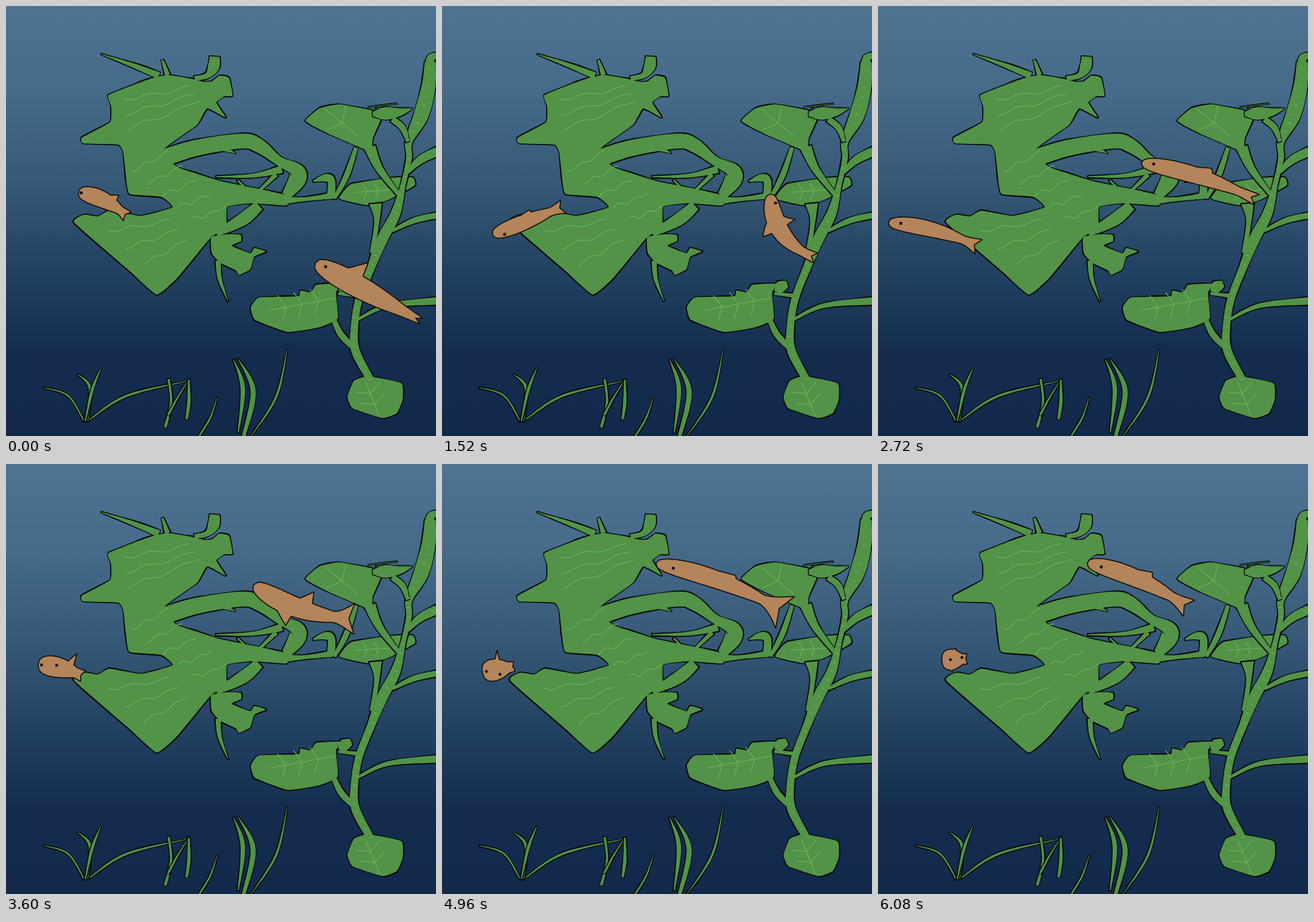
Animation of 748 by 748 pixels, one loop 6160 ms. Source, as an HTML page with a canvas:

```html
<!DOCTYPE html>
<html lang="en">
<meta charset="utf-8">
<title>Two fish among water plants</title>
<style>
  html, body { margin: 0; height: 100%; overflow: hidden; background: #142d4f; }
  canvas { display: block; width: 100vw; height: 100vh; }
</style>
<canvas id="stage" width="748" height="748"></canvas>
<script>
const SIZE = 748, LOOP = 6160, STEP = 80;
const GREEN = "#529347", VEIN = "#67b25c", INK = "#070b0c", FISH = "#b4845a";
const stage = document.getElementById("stage").getContext("2d");
const scene = document.createElement("canvas");
scene.width = scene.height = SIZE;
const pen = scene.getContext("2d");
pen.lineCap = pen.lineJoin = stage.lineJoin = "round";

// ---- geometry ----

const points = (text, size) => {
  const n = text.split(/[ ,]+/).map(Number);
  return Array.from({ length: n.length / size }, (_, i) => n.slice(i * size, (i + 1) * size));
};

// Hermite curve through every point; all coordinates, widths too, are interpolated.
function curve(pts, closed, tension) {
  const n = pts.length, out = [], parts = 8;
  const at = i => pts[closed ? (i + n) % n : Math.min(n - 1, Math.max(0, i))];
  for (let i = 0; i < (closed ? n : n - 1); i++) {
    const [a, b, c, d] = [-1, 0, 1, 2].map(k => at(i + k));
    for (let s = 0; s < parts; s++) {
      const t = s / parts, e = t * t * (3 - 2 * t);
      out.push(b.map((v, k) => v + (c[k] - v) * e
        + tension * t * (1 - t) * ((c[k] - a[k]) * (1 - t) - (d[k] - v) * t)));
    }
  }
  return closed ? out : [...out, pts[n - 1]];
}

// The two edges of a spine of [x, y, half width, other half width].
function edges(spine) {
  const up = [], down = [];
  spine.forEach(([x, y, w, v = w], i) => {
    const [x0, y0] = spine[Math.max(0, i - 1)];
    const [x1, y1] = spine[Math.min(spine.length - 1, i + 1)];
    const len = Math.hypot(x1 - x0, y1 - y0) || 1;
    const nx = (y1 - y0) / len, ny = (x0 - x1) / len;
    up.push([x + nx * w, y + ny * w]);
    down.unshift([x - nx * v, y - ny * v]);
  });
  return [up, down];
}

const blob = text => curve(points(text, 2), true, .2);
const limb = text => edges(curve(points(text, 3), false, .5).map(([x, y, w]) => [x, y, Math.max(.2, w / 2)])).flat();

function trace(ctx, pts) {
  ctx.beginPath();
  pts.forEach(([x, y]) => ctx.lineTo(x, y));
}

// ---- hand-drawn plants ----

// Ink of uneven weight goes under all parts, so that joined parts share one outline.
function plant(weight, ...parts) {
  pen.strokeStyle = INK;
  for (const part of parts) {
    part.forEach((p, i) => {
      trace(pen, [p, part[(i + 1) % part.length]]);
      pen.lineWidth = weight * (1 + .4 * Math.sin(i * .31 + p[0] * .02) * Math.sin(i * .13));
      pen.stroke();
    });
  }
  pen.fillStyle = GREEN;
  for (const part of parts) {
    trace(pen, part);
    pen.fill();
  }
}

function line(color, width, pts) {
  pen.strokeStyle = color;
  pen.lineWidth = width;
  trace(pen, pts);
  pen.stroke();
}

// A midrib with pairs of side veins that lean towards the tip.
function veins(x0, y0, x1, y1, pairs, reach) {
  const dx = x1 - x0, dy = y1 - y0, len = Math.hypot(dx, dy);
  line(VEIN, 1.6, [[x0, y0], [x1, y1]]);
  for (let i = 1; i <= pairs; i++) {
    const t = i / (pairs + 1), x = x0 + dx * t, y = y0 + dy * t;
    for (const side of [-1, 1])
      line(VEIN, 1.5, [[x, y], [x + (dx * .5 - dy * side) / len * reach, y + (dy * .5 + dx * side) / len * reach]]);
  }
}

// Rows of ripples; each row starts and ends one step further.
function ripples(rows, [x0, y0], [x1, y1], [sx, sy], [ex, ey]) {
  for (let r = 0; r < rows; r++) {
    const ax = x0 + sx * r, ay = y0 + sy * r, bx = x1 + ex * r, by = y1 + ey * r;
    line(VEIN, 1.5, Array.from({ length: 31 }, (_, i) => {
      const t = i / 30;
      return [ax + (bx - ax) * t, ay + (by - ay) * t + 4 * Math.sin(t * 12 + r) * (1 - t * .5) + 10 * t * (1 - t)];
    }));
  }
}

function drawScene() {
  const water = pen.createLinearGradient(0, 0, 0, SIZE);
  ["#4e7492", "#466a8a", "#375a78", "#244363", "#142d4f", "#12294a"]
    .forEach((color, i) => water.addColorStop(i / 5, color));
  pen.fillStyle = water;
  pen.fillRect(0, 0, SIZE, SIZE);

  // leaf behind the stalk
  plant(3.6, blob("580,335 600,310 665,299 707,298 711,312 668,336 632,347"));
  veins(668, 320, 608, 324, 2, 13);

  // drifting leaf creature
  plant(3.6,
    blob("178,155 230,134 256,125 282,120 320,126 345,132 358,131 371,121 388,125 394,156 380,157 366,168 382,194 350,178 332,207 275,249 296,279 330,291 375,305 440,318 490,330 488,347 430,343 385,349 383,385 356,403 298,473 262,502 215,461 119,377 136,363 160,366 180,356 235,365 290,350 270,332 215,327 209,300 204,255 195,241 135,239 132,229 181,202 183,175"),
    limb("166,84,1 215,101,7 266,121,12"),
    limb("272,94,4 281,120,9"),
    limb("363,88,17 361,106,20 350,121,10 328,126,8"),
    limb("270,266,30 330,247,28 410,235,26 440,243,24 474,269,16 506,286,24 506,303,30 487,330,16"),
    limb("362,241,16 399,256,1"),
    limb("366,297,2 430,295,7 480,284,13"),
    limb("403,303,3 420,320,4"),
    limb("470,293,8 441,321,5"),
    limb("366,396,10 412,371,22 440,347,18"),
    limb("480,338,15 520,336,7 568,330,11"),
    limb("565,334,14 566,304,13 555,299,13 534,305,2"),
    limb("571,335,6 592,296,10 609,246,7"),
    blob("357,402 386,397 408,398 409,409 392,417 425,430 432,421 452,427 432,436 425,458 405,468 400,460 373,447 358,430"),
    limb("369,443,9 372,475,7 386,513,1"));
  ripples(3, [204, 161], [320, 140], [4, 26], [8, 12]);
  ripples(5, [218, 286], [281, 253], [27, 21], [25, 24]);
  ripples(3, [177, 390], [285, 372], [31, 29], [15, 16]);

  // stalk with its branches and leaves
  const stem = "634,650,13 608,600,15 606,560,13 614,510,13 635,455,14 655,405,19 678,360,17 691,310,9 701,265,10 701,235,13 722,190,26 735,140,24 738,97,19";
  plant(3.6,
    limb(stem),
    limb("738,104,18 739,90,13 752,86,11"),
    limb("738,104,2 742,118,5 752,125,5"),
    limb("612,545,5 665,521,8 750,513,13"),
    limb("672,391,5 710,373,10 750,364,10"),
    limb("698,290,6 720,268,14 750,253,16"),
    limb("643,344,22 645,375,9 637,430,9"),
    blob("521,200 545,178 580,171 639,182 653,194 638,230 636,253 613,245 560,222"),
    limb("633,246,20 650,284,13 686,331,7"),
    blob("426,524 440,507 508,505 512,495 530,498 540,485 582,483 574,499 577,544 545,559 490,567 433,546"),
    limb("571,548,9 583,572,11 602,592,10"),
    blob("578,495 583,480 598,478 602,489 590,500"),
    limb("578,500,5 612,504,7"),
    blob("605,652 630,644 688,656 690,685 680,708 655,717 603,700 594,680"));
  plant(3,
    limb("638,188,8 660,187,22 685,185,13 706,179,1"),
    limb("672,197,10 690,212,11 699,236,6"),
    limb("630,176,1 680,170,1"),
    limb("643,178,1 707,178,1"));
  veins(612, 226, 557, 181, 1, 26);
  veins(572, 508, 459, 529, 3, 22);
  veins(649, 712, 626, 655, 2, 22);
  pen.setLineDash([1.3, 15]);
  pen.lineCap = "butt";
  line(VEIN, 6, curve(points(stem, 3), false, .5));
  pen.setLineDash([]);
  pen.lineCap = "round";

  // grass
  for (const blade of [
    "66,664,1 108,678,3 136,722,2", "125,641,1 146,664,5 142,722,2", "165,630,1 150,668,5 138,722,2",
    "146,719,2 210,678,4 318,652,1", "283,649,4 287,690,4 277,733,5", "318,650,1 298,682,3 282,712,4",
    "318,650,3 318,690,6 314,719,4", "335,750,3 355,717,3 367,682,1", "396,615,1 412,665,8 404,742,2",
    "404,614,1 430,670,9 413,750,6", "489,598,1 470,680,4 425,750,1",
  ]) plant(3.4, limb(blade));
}

// ---- fish ----

// Both swim with the nose to the left. bend lifts the middle of the spine;
// eyes are two pairs of place along the spine and height above it.
const calm = { bend: 0, girth: 16, flare: 10, fin: 0, finAt: .45, belly: 0, eyes: [.11, 0, .11, 0], eyeSize: 2.5 };
const left = [], right = [];
const pose = (path, time, nose, tail, shape) => path.push({ ...calm, ...shape, time, nose, tail });

pose(left, 0, [126, 324], [211, 366], { bend: 7, girth: 15, fin: 10, finAt: .55, eyes: [.05, 0, .05, 0] });
pose(left, 720, [146, 373], [263, 343], { bend: 6, girth: 17, fin: 12, finAt: .35, eyes: [.1, 9, .16, -12] });
pose(left, 1520, [88, 398], [211, 349], { girth: 14, flare: 12, fin: 5, eyes: [.15, -7, .15, -7] });
pose(left, 2720, [18, 377], [175, 419], { bend: 8, girth: 14, flare: 14, eyes: [.13, 1, .13, 1] });
pose(left, 3600, [56, 349], [134, 369], { bend: 4, girth: 18, fin: 22, finAt: .6, eyes: [.07, 0, .39, 3] });
pose(left, 4960, [70, 362], [126, 352], { girth: 19, flare: 8, fin: 18, eyes: [.13, 0, .52, -9] });
pose(left, 6080, [111, 341], [155, 339], { girth: 18, flare: 9, fin: 4, belly: 3, eyes: [.34, 0, .8, 3] });

pose(right, 0, [538, 447], [722, 548], { girth: 20, flare: 5, fin: 26, finAt: .26, eyes: [.09, 3, .09, 3] });
pose(right, 720, [551, 416], [700, 503], { bend: 10, girth: 18, flare: 20, fin: 10, belly: 5 });
pose(right, 1520, [572, 327], [650, 438], { bend: -23, flare: 9, fin: 18, finAt: .3, belly: 18, eyes: [.13, 8, .13, 8] });
pose(right, 2720, [458, 273], [659, 337], { bend: 8, girth: 15, fin: 8, eyes: [.1, 2, .1, 2] });
pose(right, 3600, [431, 210], [606, 269], { bend: -14, girth: 18, flare: 27, fin: 22, belly: 20, eyeSize: 0 });
pose(right, 4960, [372, 173], [597, 258], { bend: 11, flare: 32, fin: 5, eyes: [.13, -2, .13, -2] });
pose(right, 6080, [364, 172], [541, 251], { bend: 10, flare: 17, fin: 8, eyes: [.13, -1, .13, -1] });

const mix = (a, b, t) => Array.isArray(a) ? a.map((v, i) => mix(v, b[i], t)) : a + (b - a) * t;

function poseAt(path, time) {
  const i = Math.max(1, path.findIndex(p => p.time >= time));
  const a = path[i - 1], b = path[i], t = (time - a.time) / (b.time - a.time);
  return Object.fromEntries(Object.keys(a).map(k => [k, mix(a[k], b[k], t)]));
}

function drawFish({ nose, tail, bend, girth, flare, fin, finAt, belly, eyes, eyeSize }) {
  const dx = tail[0] - nose[0], dy = tail[1] - nose[1], len = Math.hypot(dx, dy);
  const place = (u, lift) => {
    const h = 4 * bend * u * (1 - u) + lift;
    return [nose[0] + dx * u + dy / len * h, nose[1] + dy * u - dx / len * h];
  };
  const swept = x => x > 0 && x < .13 ? x / .13 : 0;
  const spine = Array.from({ length: 61 }, (_, i) => {
    const u = i / 60;
    const w = 2.15 * girth * u ** .4 * (1 - u) ** .8 + flare * Math.max(0, u * 5 - 4) ** 1.5;
    return [...place(u, 0), w + fin * swept(u - finAt), w + belly * swept(u - .3)];
  });
  const [back, front] = edges(spine);
  trace(stage, [...back, place(.95, 0), ...front]);
  stage.closePath();
  stage.fillStyle = FISH;
  stage.strokeStyle = "#14100c";
  stage.lineWidth = 1.8;
  stage.fill();
  stage.stroke();

  stage.fillStyle = "#120d0a";
  for (const i of [0, 2]) {
    stage.beginPath();
    stage.arc(...place(eyes[i], eyes[i + 1]), eyeSize, 0, 7);
    stage.fill();
  }
}

function draw(time) {
  stage.drawImage(scene, 0, 0);
  for (const path of [left, right]) drawFish(poseAt(path, time));
}

drawScene();
const start = performance.now();
function tick() {
  const time = (performance.now() - start) % LOOP;
  draw(Math.floor(time / STEP) * STEP);
  requestAnimationFrame(tick);
}
tick();
</script>
</html>
```
